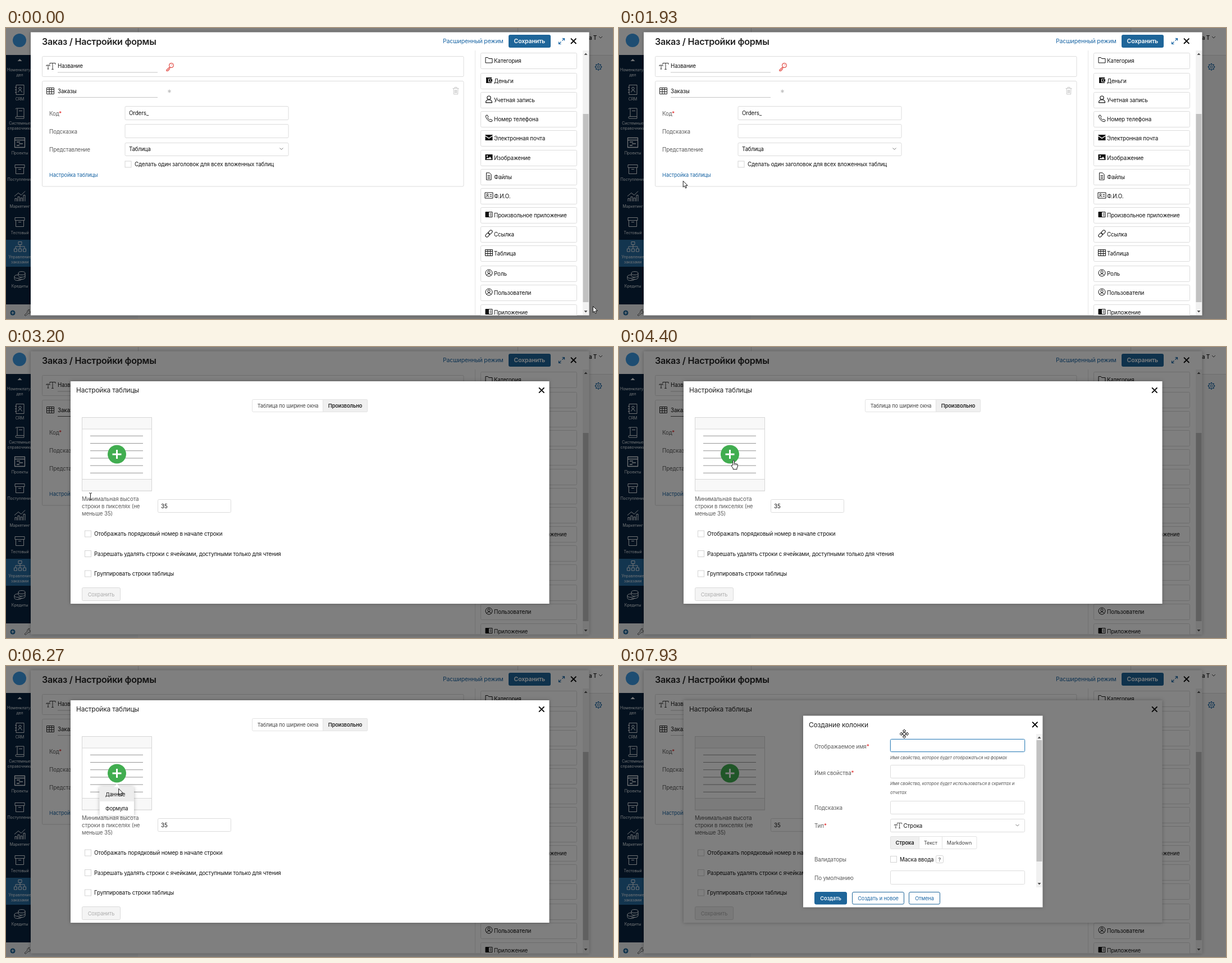
An HTML page for the animation above (8000 ms loop, 1081x518 px).

```html
<!DOCTYPE html>
<html lang="ru">
<head>
<meta charset="utf-8">
<style>
html, body { margin: 0; width: 100%; height: 100%; overflow: hidden; background: #7f7f7f; }
svg { display: block; width: 1081px; height: 518px; }
text { font-family: Inter, Roboto, sans-serif; letter-spacing: -0.015em; white-space: pre; }
.sheet { filter: drop-shadow(0 0 3px rgba(0,0,0,.28)); }
</style>
</head>
<body>
<svg id="stage" viewBox="0 0 1081 518" xmlns="http://www.w3.org/2000/svg"></svg>
<script>
const BLUE = '#1e6599', LINK = '#1a66a5', LABEL = '#5c5c5c', EDGE = '#dcdcdc', DARK = '#222', INK = '#111', PALE = '#e6eaee';
const LOOP = 8000;

// Drawing helpers; text is placed by the middle of its capitals.
const box = (x, y, w, h, fill = '#fff', stroke = 'none', r = 0, extra = '') =>
  `<rect x="${x}" y="${y}" width="${w}" height="${h}" fill="${fill}" stroke="${stroke}" rx="${r}" ${extra}/>`;
const text = (x, cy, s, { size = 9.8, fill = INK, weight = 400, anchor = 'start', style = 'normal' } = {}) =>
  `<text x="${x}" y="${(cy + size * .36).toFixed(2)}" font-size="${size}" fill="${fill}" font-weight="${weight}" text-anchor="${anchor}" font-style="${style}">${s}</text>`;
const line = (d, stroke = INK, w = 1, extra = '') =>
  `<path d="${d}" fill="none" stroke="${stroke}" stroke-width="${w}" stroke-linejoin="round" ${extra}/>`;
const shape = (d, fill = INK) => `<path d="${d}" fill="${fill}" fill-rule="evenodd"/>`;
const disc = (x, y, r, fill = 'none', stroke = 'none', w = 1) =>
  `<circle cx="${x}" cy="${y}" r="${r}" fill="${fill}" stroke="${stroke}" stroke-width="${w}"/>`;
const at = (x, y, body) => `<g transform="translate(${x} ${y})">${body}</g>`;
const group = (id, body) => `<g id="${id}">${body}</g>`;
const field = (x, y, w, h) => box(x + .5, y + .5, w - 1, h - 1, '#fff', EDGE, 2);
const tick = (x, y, id = '') => box(x + .5, y + .5, 11, 11, '#fff', '#d4d4d4', 0, id && `id="${id}"`);
const cross = (x, y) => line(`M${x - 4.7} ${y - 4.7}l9.4 9.4m0-9.4l-9.4 9.4`, '#000', 1.8);
const chevron = (x, y, c = '#777') => line(`M${x - 3} ${y - 1.5}l3 3 3-3`, c, 1);
const star = '<tspan fill="#e02020">*</tspan>';
const veil = id => box(0, 0, 1081, 518, '#000', 'none', 0, `id="${id}" fill-opacity=".5"`);
const bigT = (x, y) => at(x, y, line('M.5 6V4.2H6.500V6M3.500 4.2V11M2 11h3M6.500 3V.500H16.500V3M11.500.500V11.500M9.700 11.500h3.600', DARK, .9));

function scrollbar(x, top, bottom, from, to) {
  const mid = x + 5.5;
  return box(x, top, 11, bottom - top, '#f1f1f1') + box(x + .5, from, 10, to - from, '#c1c1c1') +
    shape(`M${mid - 3} ${top + 8}h6l-3-3.4z`, '#505050') + shape(`M${mid - 3} ${bottom - 8}h6l-3 3.4z`, '#505050');
}

const grid = 'M.5 1.5h13v11h-13zM.5 4.5h13M.5 8.5h13M5 1.5v11M9.3 1.5v11';
const appIcon = line('M1 2.5h12v9H1z') + shape('M1 2.5h6v9H1z') + line('M8.5 5h3M8.5 7h3M8.5 9h3', INK, .8);
const userIcon = disc(7, 7, 6, 'none', INK) + disc(7, 5.4, 2.2, 'none', INK) + line('M3 11.4q.6-2.8 4-2.8t4 2.8');
const palette = [
  ['Категория', 58, line('M1 2.5h4.2l1.4 2H13V12H1z')],
  ['Деньги', 94, shape('M2 2h10v2.2H6v6.2h6V12H2z') + shape('M7 5h6v4.5H7zM9 6.4v1.7h1.7V6.4z')],
  ['Учетная запись', 128, disc(7, 4.2, 3.2, 'none', INK, 1.2) + line('M1.5 12.8q0-4.3 3.5-4.8h4q3.5.5 3.5 4.8z', INK, 1.2)],
  ['Номер телефона', 162, line('M1.5 2L4 .8 6 4.2 4.6 5.6q1 2.6 3.9 3.9L10 8.3l3.2 2-1.2 2.4q-3.4 1-7.4-3.2T1.5 2z')],
  ['Электронная почта', 196, shape('M.5 2h13v1.3L7 7.6.5 3.3zM.5 4.8L7 9.1l6.5-4.3V12H.5z')],
  ['Изображение', 231, shape('M.5 2h13v10H.5zM2 10.6h10L9 6 6.6 9 5 7.6zM3 4v2h2V4z')],
  ['Файлы', 265, line('M2.5.8h5.6l3 3v9.4H2.5zM4.5 5.5h4.6M4.5 8h4.6M4.5 10.5h4.6')],
  ['Ф.И.О.', 299, line('M0 2h14v10H0zM8.5 5.5h3.5M8.5 8.5h3.5M2 9.8q.3-2 2.4-2t2.4 2') + disc(4.4, 5.6, 1.5, 'none', INK)],
  ['Произвольное приложение', 333, appIcon],
  ['Ссылка', 367, `<g transform="rotate(-45 7 7)">${box(-.5, 4.5, 8, 5, 'none', INK, 2.5)}${box(6.5, 4.5, 8, 5, 'none', INK, 2.5)}</g>`],
  ['Таблица', 401, line(grid)],
  ['Роль', 437, userIcon],
  ['Пользователи', 471, userIcon],
  ['Приложение', 506, appIcon]
];

const thin = (d, w = 1) => line(d, PALE, w);
const archive = thin('M1 1h17v5H1zM2.5 6v11h14V6M7 9h5');
const menu = [
  [110, 126, ['CRM'], thin('M3 1h14v17H3zM1 5h3M1 9.5h3M1 14h3M6.5 14q.5-3.5 3.5-3.5t3.5 3.5') + disc(10, 7, 2.2, 'none', PALE)],
  [152, 169, ['Системные', 'справочники'], thin('M2 2q0-1.500 1.500-1.500H17V15H3.500Q2 15 2 17t1.500 1.500H17V15M5 .5V15M8 5h6')],
  [204, 222, ['Проекты'], thin('M.5 1h18v17H.5zM.5 5h18M4 8.500h6M8 11.500h7M4 14.500h5', 1.3)],
  [252, 269, ['Поступления'], archive],
  [299, 317, ['Маркетинг'], thin('M1 19v-5h3v5M6 19v-8h3v8M11 19v-6h3v6M16 19V8h3v11M0 10l7-6 5 4 7-7')],
  [346, 364, ['Тестовый'], archive],
  [390, 407, ['Управление', 'заказами'], thin('M7 0h6v5H7zM10 5v7M2 12V8.500h16V12M-.5 12.500h5v5h-5zM7.500 12.500h5v5h-5zM15.500 12.500h5v5h-5z')],
  [442, 459, ['Кредиты'], thin('M7 4q0-3 6-3t6 3-6 3-6-3v4q0 3 6 3t6-3V4M7 7q-7 0-7 3t6 3 7-2M0 10v4q0 3 6 3t7-3M7 15q11 1 12-3V8')]
];

function page() {
  const small = { size: 7.05, fill: PALE, anchor: 'middle' };
  let s = box(0, 0, 1081, 518, '#f6f6f6') + box(0, 0, 1081, 48) + line('M235.500 0V48M911.500 0V48M0 48.500H1081', '#dedede');
  s += box(0, 48, 49, 444, '#08233f') + box(0, 377, 49, 48, '#266a9f') + box(0, 492, 235, 26, '#eef0f2');
  s += disc(24, 22, 12, '#3c9be6') + shape('M20.500 59h8l-4-4z', PALE);
  s += text(24.5, 74, 'Номенклату..', small) + text(24.5, 83.5, 'дел', small);
  for (const [iy, ty, words, icon] of menu)
    s += at(15, iy - 9.5, icon) + words.map((w, i) => text(24.5, ty + i * 9.8, w, small)).join('');
  s += disc(12, 507, 4.5, BLUE) + line('M9.500 507h5M12 504.500v5', '#fff', 1.2);
  s += line('M33 511l5-5q-1-4 4-5l-1.500 3 2 1.500 2-2q0 5-5 4.500l-4.500 4.500z', '#555');
  s += text(1038, 17, 'а Т', { size: 9.8, fill: DARK, weight: 600 }) + chevron(1059, 16.5, '#444');
  let gear = '';
  for (let i = 0; i < 8; i++) gear += line('M0-4.600V-6.300', LINK, 2, `transform="rotate(${i * 45})"`);
  return s + at(1055, 69.3, gear + disc(0, 0, 4.7, 'none', LINK) + disc(0, 0, 2, 'none', LINK));
}

function formDialog() {
  let s = box(44, 7.5, 994.5, 504, '#fff', 'none', 0, 'class="sheet"');
  s += text(64, 23.8, 'Заказ / Настройки формы', { size: 16.1, weight: 600, fill: DARK });
  s += text(778, 23.5, 'Расширенный режим', { size: 10.5, fill: LINK });
  s += box(895, 12, 75, 23, BLUE, 'none', 3) + text(932.3, 23.5, 'Сохранить', { size: 10.5, fill: '#fff', weight: 600, anchor: 'middle' });
  s += line('M984.500 28.500l4-4M984.500 24.500v4h4M990.500 22.500l4-4M990.500 18.500h4v4', LINK, 1.2) + cross(1010.7, 23.3);
  s += box(64.5, 50.5, 750.5, 36, '#fff', EDGE, 2) + box(64.5, 94.5, 750.5, 187.5, '#fff', EDGE, 2);
  s += bigT(71.5, 62) + text(92, 67.5, 'Название') + line('M92 79H270', '#c4c4c4');
  s += at(285, 62, disc(9.5, 4.5, 3.9, 'none', '#e2504a', 1.2) + disc(10.5, 3.6, .8, '#e2504a') + line('M6.800 7.300L.8 12.800v1.500h3v-2h2v-2l2-2', '#e2504a', 1.2));
  s += at(72, 105, line(grid, DARK)) + text(92, 112, 'Заказы') + line('M92 123.500H270', '#c4c4c4', 1, 'id="rule"');
  s += box(125.8, 105.5, 1, 12.5, '#000', 'none', 0, 'id="nameCaret"');
  s += line('M291 109.500v6M288.400 111l5.200 3M293.600 111l-5.200 3', '#bdbdbd', 1.2);
  s += line('M795.500 107.500h11M799 107.500v-2h4v2M797 107.500l.5 10.500h7l.5-10.500M799.500 110v6M801 110v6M802.500 110v6', '#c9c9c9');
  [['Код' + star, 152, 139], ['Подсказка', 184, 171], ['Представление', 216, 204]].forEach(([name, cy, y], i) => {
    s += text(77, cy, name, { fill: LABEL }) + field(211.5, y, 292, i < 2 ? 25 : 24);
  });
  s += text(219, 151.5, 'Orders_') + text(219, 215.5, 'Таблица') + chevron(490.5, 215);
  s += tick(211.5, 236.5) + text(229, 242.5, 'Сделать один заголовок для всех вложенных таблиц');
  s += text(77, 261.5, 'Настройка таблицы', { size: 9.2, fill: LINK });
  s += line('M835.500 40V511', '#e6e6e6');
  let list = '';
  for (const [name, cy, icon] of palette)
    list += box(845.5, cy - 13.5, 171, 28, '#fff', EDGE, 2) + at(853, cy - 8, icon) + text(869, cy + .5, name, { size: 9.9 });
  s += `<clipPath id="body"><rect x="836" y="40" width="203" height="471.500"/></clipPath><g clip-path="url(#body)">${list}</g>`;
  return s + scrollbar(1027, 40, 511, 153, 488);
}

function tableDialog() {
  let s = box(115, 61, 852.5, 396, '#fff', 'none', 0, 'class="sheet"');
  s += text(125, 77, 'Настройка таблицы', { size: 11.9, fill: DARK }) + cross(953.8, 77);
  s += box(438.5, 93.5, 205, 22, '#fff', '#e2e2e2', 2) + box(564.5, 93.5, 79, 22, '#f0f0f0', '#e2e2e2', 1);
  s += text(502, 104.3, 'Таблица по ширине окна', { size: 9.2, fill: '#444', anchor: 'middle' });
  s += text(604, 104.3, 'Произвольно', { size: 9.3, fill: DARK, weight: 600, anchor: 'middle' });
  s += box(135.5, 125.5, 124, 130.5, '#fff', '#d6d6d6') + box(135.5, 125.5, 124, 20.5, '#f8f8f8', '#d6d6d6') + box(135.5, 235.5, 124, 20.5, '#f8f8f8', '#d6d6d6');
  for (let i = 0; i < 6; i++) s += line(`M150 ${158.300 + i * 13.2}H244`, '#8a8a8a', .9);
  s += disc(197.5, 191, 16.5, '#41ad50') + line('M189.500 191h16M197.500 183v16', '#fff', 3);
  ['Минимальная высота', 'строки в пикселях (не', 'меньше 35)'].forEach((w, i) => s += text(135, 270 + i * 13.2, w, { fill: LABEL }));
  s += field(270, 271, 131, 24) + text(276, 283, '35');
  ['Отображать порядковый номер в начале строки', 'Разрешать удалять строки с ячейками, доступными только для чтения', 'Группировать строки таблицы']
    .forEach((w, i) => s += tick(140, 326.5 + i * 35.5) + text(157, 332.5 + i * 35.5, w));
  s += box(135.5, 428.5, 68, 23, '#f4f4f4', '#dadada', 2) + text(169.5, 440.3, 'Сохранить', { size: 9.3, fill: '#adadad', anchor: 'middle' });
  return s + group('popup', box(166.5, 215.5, 61.5, 51, '#fff', 'none', 1, 'class="sheet"') + shape('M192 216l5.500-6 5.500 6z', '#fff') +
    box(166.5, 215.5, 61.5, 25.5, '#ededed') + text(177, 228.8, 'Данные', { size: 9.3 }) + text(177, 254, 'Формула', { size: 9.3 }));
}

function columnDialog() {
  const hint = { size: 7.8, fill: '#555', style: 'italic' };
  let s = box(328, 88.5, 426.5, 341, '#fff', 'none', 0, 'class="sheet"');
  s += text(338, 104.3, 'Создание колонки', { size: 12, fill: DARK }) + cross(740.8, 104.3);
  [['Отображаемое имя' + star, 143.5], ['Имя свойства' + star, 190], ['Подсказка', 252], ['Тип' + star, 284.5], ['Валидаторы', 344], ['По умолчанию', 377]]
    .forEach(([w, y]) => s += text(348, y, w, { fill: LABEL }));
  s += box(482.5, 129.5, 241, 24, 'none', '#bcd9ee', 3, 'stroke-opacity=".6"') + box(483.5, 130.5, 239, 22, '#fff', '#3f87bb', 2);
  s += box(493.2, 135, 1, 12.5, '#000', 'none', 0, 'id="fieldCaret"');
  s += text(483, 163, 'Имя свойства, которое будет отображаться на формах', hint);
  s += text(483, 209.5, 'Имя свойства, которое будет использоваться в скриптах и', hint) + text(483, 225, 'отчетах', hint);
  s += field(483, 176, 240, 24) + field(483, 240, 240, 24) + field(483, 272, 240, 24) + field(483, 364, 240, 25);
  s += at(490, 279, `<g transform="scale(.83)">${bigT(0, 0)}</g>`) + text(506.5, 284.5, 'Строка') + chevron(709.5, 283.5);
  s += box(483.5, 303.5, 153.5, 22, '#fff', '#e2e2e2', 2) + box(483.5, 303.5, 51, 22, '#f0f0f0', '#e2e2e2', 1) + line('M575.500 303.500v22', '#e2e2e2');
  s += text(509, 314.7, 'Строка', { size: 9.4, weight: 600, fill: DARK, anchor: 'middle' });
  s += text(555, 314.7, 'Текст', { size: 9.1, fill: '#444', anchor: 'middle' }) + text(606, 314.7, 'Markdown', { size: 9.1, fill: '#444', anchor: 'middle' });
  s += tick(483, 338, 'mask') + text(500, 344, 'Маска ввода') + box(564.5, 337.5, 13, 13, '#fff', '#d4d4d4', 2) + text(571, 344.3, '?', { size: 9, weight: 600, fill: '#666', anchor: 'middle' });
  const button = (x, w, name, main) => box(x + .5, 402.5, w - 1, 21.5, main ? BLUE : '#fff', BLUE, 2.5) +
    text(x + w / 2, 413.3, name, { size: 9.2, fill: main ? '#fff' : LINK, weight: main ? 600 : 400, anchor: 'middle' });
  s += button(348, 58, 'Создать', true) + button(415, 93, 'Создать и новое') + button(516, 56, 'Отмена');
  return s + scrollbar(743, 121, 394, 132, 348);
}

// Pointers share one local origin: the hot spot.
const outlined = d => `<path d="${d}" fill="#fff" stroke="#000" stroke-width=".9" stroke-linejoin="round"/>`;
const pointers = {
  arrow: outlined('M.4.400V11.300L2.900 9 4.700 13.200 6.500 12.400 4.800 8.400H8.300z'),
  hand: outlined('M-1.300 9V1Q0-.8 1.300 1V5.800Q2.600 4.900 3.400 6.300 4.600 5.500 5.400 6.800 7.200 6.300 7.200 8.200V11.500L6 14V16.300H-.8V14.500L-3.600 10.500Q-4 8.500-2.400 8.800z') +
    line('M1.300 6v3M3.400 6.500v2.500M5.400 7v2', '#000', .7),
  beam: line('M-2.500-6H-.6L0-5.500.6-6H2.500M0-5.500V5.500M-2.500 6H-.6L0 5.500.6 6H2.500', '#000', .9),
  move: outlined('M0-8L2.800-5H1V-1H5V-2.800L8 0 5 2.800V1H1V5H2.800L0 8-2.800 5H-1V1H-5V2.800L-8 0-5-2.800V-1H-1V-5H-2.800z') + disc(0, 0, 2.6, '#fff', '#000', .9)
};

// [from ms, pointer]
const kinds = [[0, 'arrow'], [2030, 'hand'], [3190, 'beam'], [4060, 'arrow'], [4300, 'hand'], [6260, 'arrow'], [6930, 'move']];
// [ms, x, y, eased?]: the pointer reaches x,y at ms
const path = [
  [0, 1045, 495], [870, 300, 348, 1], [1000, 273.5, 346.5], [1370, 205, 316], [1730, 153, 283],
  [1930, 114, 272], [2100, 82, 259], [2270, 128, 261], [2400, 149, 265],
  [3190, 149, 265], [3200, 150.5, 266], [3400, 150.5, 266], [3530, 161.5, 268.6], [3730, 161.5, 269],
  [4000, 161.5, 269], [4130, 172, 256], [4200, 192, 232], [4270, 209, 213], [4330, 210, 206], [4400, 204, 201.5],
  [4930, 204, 201.5], [5270, 200.3, 218, 1], [6400, 200.3, 218], [7070, 502, 120, 1], [7130, 508, 120.8]
];

function pointerAt(t) {
  const i = path.findIndex(p => p[0] > t);
  if (i < 0) return path[path.length - 1].slice(1, 3);
  const [t0, x0, y0] = path[i - 1], [t1, x1, y1, eased] = path[i];
  let k = (t - t0) / (t1 - t0);
  if (eased) k = k * k * (3 - 2 * k);
  return [x0 + (x1 - x0) * k, y0 + (y1 - y0) * k];
}

const stage = document.getElementById('stage');
stage.innerHTML = page() + veil('veil1') + formDialog() +
  group('table', veil('veil2') + tableDialog()) + group('column', veil('veil3') + columnDialog()) +
  group('pointer', Object.entries(pointers).map(([k, v]) => group(k, v)).join(''));

const el = id => document.getElementById(id);
const show = (id, on) => el(id).setAttribute('display', on ? 'inline' : 'none');

function render(t) {
  const table = t >= 3195, column = t >= 6325;
  show('table', table);
  show('column', column);
  show('veil1', !table);
  show('veil2', table && !column);
  show('popup', t >= 4665 && !column);

  const focused = t >= 3065 && t < 4595;
  show('nameCaret', focused);
  el('rule').setAttribute('stroke', focused ? '#555' : '#c4c4c4');
  show('fieldCaret', Math.floor((t - 6330) / 533) % 2 === 0);

  const fade = Math.min(1, Math.max(0, (t - 6340) / 150));
  const mix = (a, b) => Math.round(a + (b - a) * fade);
  el('mask').setAttribute('stroke', `rgb(${mix(75, 212)},${mix(110, 212)},${mix(140, 212)})`);

  const kind = kinds.filter(k => k[0] <= t).pop()[1];
  for (const k in pointers) show(k, k === kind);
  const [x, y] = pointerAt(t);
  el('pointer').setAttribute('transform', `translate(${x.toFixed(2)} ${y.toFixed(2)})`);
}

const begin = performance.now();
function frame() {
  render((performance.now() - begin) % LOOP);
  requestAnimationFrame(frame);
}
render(0);
requestAnimationFrame(frame);
</script>
</body>
</html>
```
